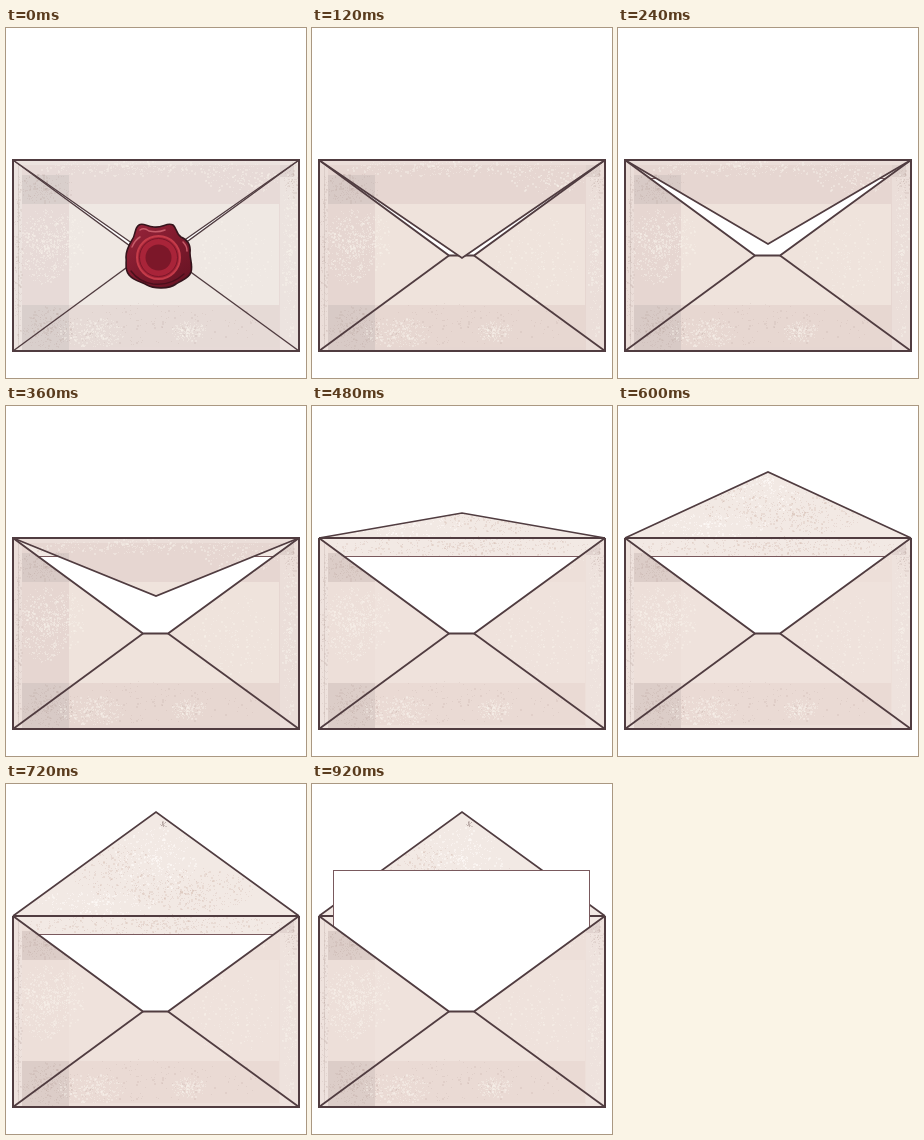
An HTML page with a canvas that plays this animation: 300 by 350 pixels, repeating every 1.22 s.

```html
<!DOCTYPE html>
<html lang="en">
<head>
<meta charset="utf-8">
<title>Opening envelope</title>
<style>
  html, body { margin: 0; width: 100%; height: 100%; overflow: hidden; background: #fff; }
  canvas { display: block; width: 300px; height: 350px; }
</style>
</head>
<body>
<canvas id="stage" width="300" height="350"></canvas>
<script>
const ctx = document.getElementById('stage').getContext('2d');
const LOOP = 1220;
const INK = '#503c40';
const L = 7, R = 293, TOP = 132, BOTTOM = 323;
const NOTCH = [[137, 227.5], [162, 227.5]];

// at: start in ms, tip: height of the flap's point, paper: tint, letter: top edge
const STEPS = [
  { at: 0,   tip: 232, paper: 'grey', letter: 150, seal: true },
  { at: 120, tip: 230, paper: 'rose', letter: 150 },
  { at: 240, tip: 216, paper: 'rose', letter: 150 },
  { at: 360, tip: 190, paper: 'rose', letter: 150 },
  { at: 480, tip: 107, paper: 'warm', letter: 150 },
  { at: 600, tip: 66,  paper: 'warm', letter: 150 },
  { at: 720, tip: 28,  paper: 'warm', letter: 150 },
  { at: 920, tip: 28,  paper: 'warm', letter: 86 }
];

const TINTS = {
  grey: { edge: '#ece3df', outer: '#e7dad7', centre: '#efe8e3', dark: '#d9cfcc', low: '#e6dad6' },
  rose: { edge: '#ebded9', outer: '#e6d6d1', centre: '#efe3dc', dark: '#d8cac6', low: '#e7d7d1' },
  warm: { edge: '#eee2dd', outer: '#eddfd9', centre: '#efe2dc', dark: '#dccdc8', low: '#eadad4' }
};

function random(seed) {
  return () => {
    seed = (seed + 0x6D2B79F5) | 0;
    let t = Math.imul(seed ^ (seed >>> 15), 1 | seed);
    t = (t + Math.imul(t ^ (t >>> 7), 61 | t)) ^ t;
    return ((t ^ (t >>> 14)) >>> 0) / 4294967296;
  };
}

function layer(paint) {
  const c = document.createElement('canvas');
  c.width = 300;
  c.height = 350;
  paint(c.getContext('2d'));
  return c;
}

// Flecks thin out towards the rim of an ellipse
function flecks(g, rnd, x, y, rx, ry, count, color) {
  g.fillStyle = color;
  for (let i = 0; i < count; i++) {
    const a = rnd() * Math.PI * 2, d = rnd() ** 0.7, s = rnd() < 0.8 ? 1 : 2;
    g.fillRect(Math.round(x + Math.cos(a) * d * rx), Math.round(y + Math.sin(a) * d * ry), s, s);
  }
}

function paperLayer(tint) {
  return layer(g => {
    const rnd = random(11);
    const box = (color, x, y, w, h) => { g.fillStyle = color; g.fillRect(x, y, w, h); };
    box(tint.edge, L, TOP, R - L, BOTTOM - TOP);
    box(tint.outer, 16, 137, 258, 186);
    box(tint.centre, 63, 176, 210, 101);
    box(tint.low, 63, 277, 210, 42);
    box(tint.dark, 16, 147, 47, 29);
    box(tint.dark, 16, 277, 47, 46);
    box('rgba(150,130,125,.18)', 12, 135, 1, 184);
    box('rgba(150,130,125,.14)', 274, 137, 14, 12);

    const light = 'rgba(248,242,236,.4)', shade = 'rgba(176,150,145,.16)';
    flecks(g, rnd, 38, 218, 24, 38, 520, light);
    flecks(g, rnd, 62, 212, 16, 30, 150, light);
    flecks(g, rnd, 182, 303, 18, 10, 160, light);
    flecks(g, rnd, 85, 304, 34, 15, 260, light);
    flecks(g, rnd, 128, 140, 95, 8, 260, light);
    flecks(g, rnd, 236, 150, 38, 16, 180, light);
    flecks(g, rnd, 283, 225, 8, 85, 220, light);
    flecks(g, rnd, 225, 230, 42, 42, 200, light);
    flecks(g, rnd, 40, 160, 28, 16, 200, shade);
    flecks(g, rnd, 42, 300, 26, 22, 240, shade);
    flecks(g, rnd, 12, 230, 4, 85, 150, shade);
    flecks(g, rnd, 145, 296, 120, 22, 160, shade);
    flecks(g, rnd, 285, 152, 7, 20, 70, shade);
  });
}

const papers = {};
for (const name in TINTS) papers[name] = paperLayer(TINTS[name]);

const lining = layer(g => {
  const rnd = random(29);
  g.fillStyle = '#f2e9e4';
  g.fillRect(0, 0, 300, 240);
  const pink = 'rgba(205,178,168,.26)', white = 'rgba(255,252,249,.5)';
  flecks(g, rnd, 185, 106, 62, 22, 420, pink);
  flecks(g, rnd, 105, 85, 40, 30, 240, pink);
  flecks(g, rnd, 150, 140, 130, 10, 380, pink);
  flecks(g, rnd, 150, 75, 42, 32, 340, white);
  flecks(g, rnd, 90, 118, 60, 12, 200, white);
  flecks(g, rnd, 157, 40, 4, 4, 18, 'rgba(150,130,126,.35)');
});

function trace(points, close) {
  ctx.beginPath();
  points.forEach(p => ctx.lineTo(p[0], p[1]));
  if (close) ctx.closePath();
}

function line(points, width = 1.7, close = false) {
  trace(points, close);
  ctx.lineWidth = width;
  ctx.strokeStyle = INK;
  ctx.stroke();
}

function within(points, paint) {
  ctx.save();
  trace(points, true);
  ctx.clip();
  paint();
  ctx.restore();
}

function drawLetter(y) {
  within([[0, 0], [300, 0], [R, TOP], NOTCH[1], NOTCH[0], [L, TOP]], () => {
    ctx.fillStyle = '#fff';
    ctx.fillRect(21, y, 257, 150);
    ctx.strokeStyle = '#79595d';
    ctx.lineWidth = 1;
    ctx.strokeRect(21.5, y + 0.5, 256, 150);
  });
}

function disc(x, y, r, fill, stroke, width) {
  ctx.beginPath();
  ctx.arc(x, y, r, 0, Math.PI * 2);
  ctx.fillStyle = fill;
  ctx.fill();
  if (stroke) {
    ctx.strokeStyle = stroke;
    ctx.lineWidth = width;
    ctx.stroke();
  }
}

function drawSeal() {
  const wax = new Path2D('M133 197C137 194 141 199 148 199C157 200 161 194 167 197' +
    'C171 200 170 206 175 209C182 212 185 217 184 225C184 232 187 238 185 244' +
    'C183 251 175 252 170 256C163 261 148 261 141 257C136 254 128 253 123 247' +
    'C118 241 121 235 120 229C120 222 123 217 126 212C130 207 128 200 133 197Z');
  const tone = ctx.createLinearGradient(125, 197, 180, 260);
  tone.addColorStop(0, '#96243a');
  tone.addColorStop(0.5, '#7f1a2d');
  tone.addColorStop(1, '#651323');
  ctx.fillStyle = tone;
  ctx.fill(wax);
  ctx.strokeStyle = '#35141c';
  ctx.lineWidth = 1.6;
  ctx.stroke(wax);

  ctx.lineCap = 'round';
  ctx.lineWidth = 1.5;
  ctx.strokeStyle = '#c65a68';
  ctx.stroke(new Path2D('M134 202Q138 199 143 203Q151 205 159 202M126 219Q129 212 134 209M177 214Q181 218 181 223'));
  ctx.strokeStyle = '#4b0f1c';
  ctx.stroke(new Path2D('M125 243Q133 254 147 256Q165 258 178 246'));
  ctx.lineCap = 'butt';

  disc(152.5, 229.5, 21.5, '#a32236', '#c43b49', 2);
  disc(152.5, 229.5, 19, '#a92439', '#7b172a', 1);
  disc(152.5, 229.5, 13, '#7c1729');
}

function draw(step) {
  const { tip, letter, seal } = step;
  const paper = papers[step.paper];
  const up = tip < TOP;
  const flap = [[L, TOP], [150, tip], [R, TOP]];
  const mouth = [[L, TOP], ...NOTCH, [R, TOP]];
  const thin = seal ? 1.4 : 1.8;

  ctx.fillStyle = '#fff';
  ctx.fillRect(0, 0, 300, 350);
  if (up) {
    within(flap, () => ctx.drawImage(lining, 0, 0));
    line(flap, 1.6);
  }
  ctx.drawImage(paper, 0, 0);
  within(mouth, () => ctx.drawImage(lining, 0, 0));
  line([[L, TOP], [R, TOP]], 2);
  drawLetter(letter);

  line(mouth, thin);
  line([[L, BOTTOM], NOTCH[0]], thin);
  line([[R, BOTTOM], NOTCH[1]], thin);
  if (!up) {
    within(flap, () => ctx.drawImage(paper, 0, 0));
    line(flap, thin);
  }
  line([[L, TOP], [L, BOTTOM], [R, BOTTOM], [R, TOP]], 2);
  if (!up) line([[L - 1, TOP], [R + 1, TOP]], 2);
  if (seal) drawSeal();
}

const start = performance.now();
let shown = null;

function tick() {
  const t = (performance.now() - start) % LOOP;
  const step = STEPS.filter(s => s.at <= t).pop();
  if (step !== shown) draw(shown = step);
  requestAnimationFrame(tick);
}
tick();
</script>
</body>
</html>
```
